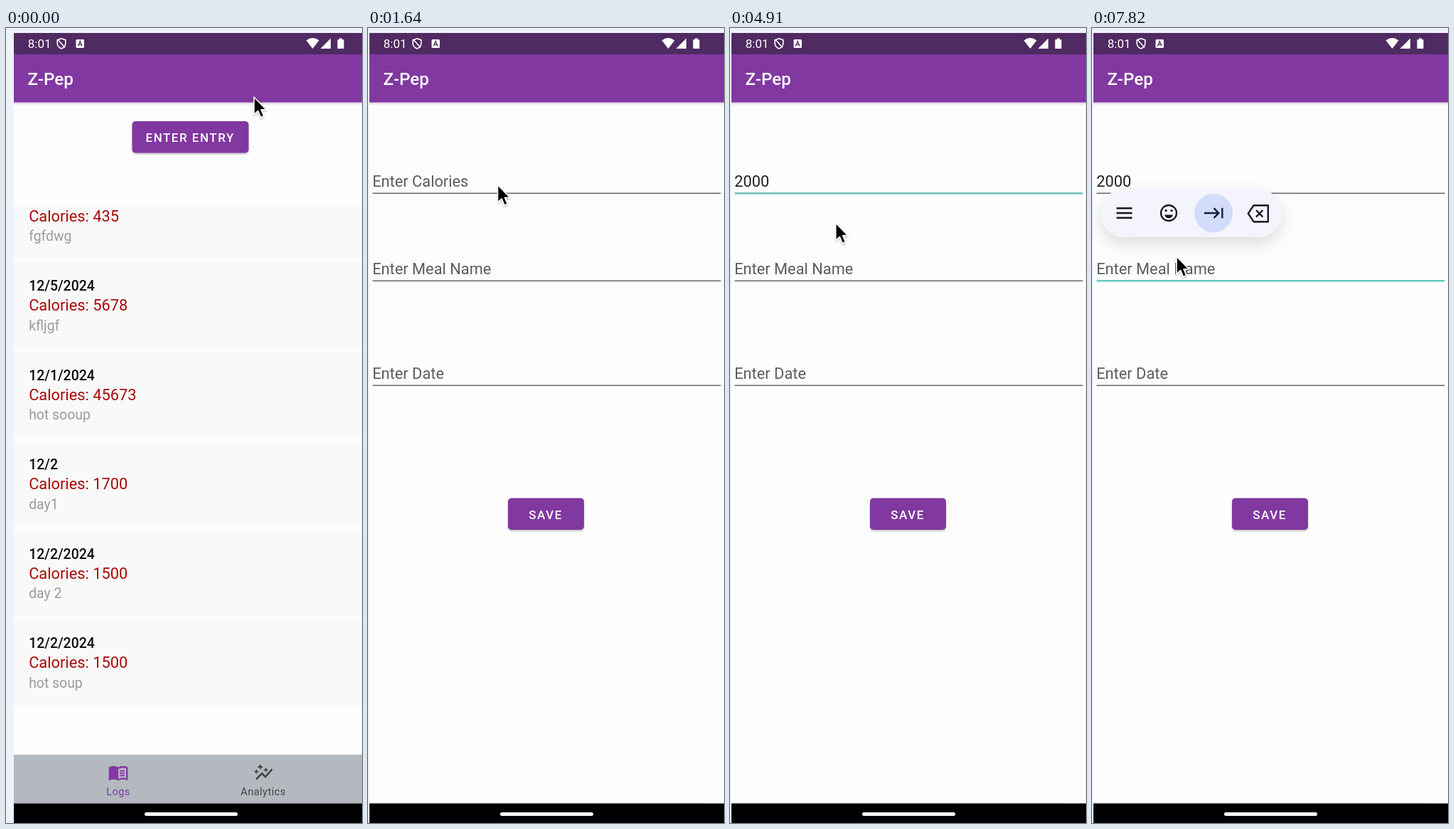
These frames come from a looping animation (501x1117 px, 8000 ms). An HTML page:

```html
<!DOCTYPE html>
<html lang="en">
<head>
<meta charset="utf-8">
<title>Calorie log</title>
<style>
  html, body { margin: 0; width: 100%; height: 100%; overflow: hidden; background: #f0f2f9; }
  svg { display: block; width: 501px; height: 1117px; }
  text { font-family: Roboto, sans-serif; white-space: pre; }
  .title { font-size: 24.2px; font-weight: 500; fill: #fff; }
  .date { font-size: 19.4px; font-weight: 500; fill: #0c0c0c; }
  .big { font-size: 21.8px; }
  .meal { font-size: 19.4px; fill: #9b9b9b; }
  .caps { font-size: 17px; font-weight: 500; letter-spacing: 1.52px; fill: #fff; }
  .tab { font-size: 14.5px; letter-spacing: .5px; text-anchor: middle; }
</style>
</head>
<body>
<svg viewBox="0 0 501 1117">
  <defs>
    <filter id="soft" x="-30%" y="-80%" width="160%" height="260%">
      <feDropShadow dx="0" dy="9" stdDeviation="11" flood-color="#000" flood-opacity=".13"/>
    </filter>
    <filter id="lift" x="-10%" y="-20%" width="120%" height="150%">
      <feDropShadow dx="0" dy="1.6" stdDeviation="1.3" flood-color="#000" flood-opacity=".28"/>
    </filter>
    <linearGradient id="edge" x2="0" y2="1">
      <stop stop-color="#d9cde0"/><stop offset="1" stop-color="#fdfdfd"/>
    </linearGradient>
    <clipPath id="content"><path d="M2 37H520V1089.5H2Z"/></clipPath>
  </defs>
  <rect width="501" height="1117" fill="#f0f2f9"/>
  <g id="phone">
    <g clip-path="url(#content)">
      <g id="list"></g>
      <g id="form"></g>
    </g>
    <g id="system"></g>
    <g id="toolbar"></g>
  </g>
  <path id="pointer" d="M0 0V24.5L5.6 19.3L9.5 28.6L13.8 26.8L10 17.7H17.3Z"
    fill="#000" stroke="#fff" stroke-width="1.6" stroke-linejoin="round" filter="url(#lift)"/>
</svg>
<script>
const LOOP = 8000, PURPLE = '#8138a0', RED = '#a80a0a';
const $ = id => document.getElementById(id);
const clamp = v => Math.max(0, Math.min(1, v));
const span = (t, from, to) => clamp((t - from) / (to - from));
const smooth = p => p * p * (3 - 2 * p);
const within = (t, from, to) => t >= from && t < to;

const text = (x, y, cls, value, extra = '') =>
  `<text x="${x}" y="${y}" class="${cls}" ${extra}>${value}</text>`;
const rect = (x, y, w, h, fill, extra = '') =>
  `<rect x="${x}" y="${y}" width="${w}" height="${h}" fill="${fill}" ${extra}/>`;
const button = (x, y, w, labelX, label) =>
  rect(x, y, w, 44.5, PURPLE, 'rx="4.8" filter="url(#lift)"') + text(labelX, y + 29, 'caps', label);
const page = () =>
  rect(2, 104, 520, 986, '#fdfdfd') + rect(2, 104, 520, 5, 'url(#edge)') +
  rect(2, 37, 520, 67.5, PURPLE) + text(21.4, 80, 'title', 'Z-Pep');

// Entries, the first one scrolled partly out of view
const entries = [
  ['', 435, 'fgfdwg'], ['12/5/2024', 5678, 'kfljgf'], ['12/1/2024', 45673, 'hot sooup'],
  ['12/2', 1700, 'day1'], ['12/2/2024', 1500, 'day 2'], ['12/2/2024', 1500, 'hot soup']
];
const entry = ([date, calories, meal], i) => {
  const y = 204.2 + i * 125.45, top = Math.max(y, 250);
  return rect(2, top, 520, y + 120 - top, '#f9f9f9') +
    text(23.2, y + 39.7, 'date', date) +
    text(23.2, y + 67.7, 'big', `Calories: ${calories}`, `fill="${RED}"`) +
    text(23.2, y + 95.2, 'meal', meal);
};

const book = 'M21 5c-1.1-.35-2.3-.5-3.5-.5-1.95 0-4.05.4-5.5 1.5-1.45-1.1-3.55-1.5-5.5-1.5S2.45 4.9 1 6' +
  'v14.65c0 .25.25.5.75.45C3.1 20.45 5.05 20 6.5 20c1.95 0 4.05.4 5.5 1.5 1.35-.85 3.8-1.5 5.5-1.5' +
  ' 1.65 0 3.35.3 4.75 1.05.5 0 .75-.2.75-.45V6c-.6-.45-1.25-.75-2-1zm0 13.5c-1.1-.35-2.3-.5-3.5-.5' +
  '-1.7 0-4.15.65-5.5 1.5V8c1.35-.85 3.8-1.5 5.5-1.5 1.2 0 2.4.15 3.5.5z';
const star = (x, y, r) => {
  const a = r * .31;
  return `M${x} ${y - r}l${a} ${r - a} ${r - a} ${a} ${a - r} ${a} ${-a} ${r - a} ${-a} ${a - r} ${a - r} ${-a} ${r - a} ${-a}z`;
};
const tabs =
  rect(2, 1021, 520, 69, '#b3b9bf') +
  `<g transform="translate(134.5 1031.5) scale(1.213)" fill="${PURPLE}"><path d="${book}"/>
    <path d="M13.8 10.6q2.6-1 5.6-.5M13.8 13.3q2.6-1 5.6-.5M13.8 16q2.6-1 5.6-.5" fill="none" stroke="${PURPLE}" stroke-width="1.4"/></g>` +
  `<g transform="translate(338.5 1031.5) scale(1.213)" fill="#444">
    <path d="${star(15, 9, 3) + star(4, 11, 3) + star(8.5, 5.5, 3.5)}"/>
    <path d="M3.7 19.8L10.5 13L14.5 17L22.3 8.2" fill="none" stroke="#444" stroke-width="2.1"/></g>` +
  text(149, 1078, 'tab', 'Logs', `fill="${PURPLE}"`) + text(353, 1078, 'tab', 'Analytics', 'fill="#444"');

$('list').innerHTML = page() + button(168.5, 131, 164, 187.5, 'ENTER ENTRY') +
  rect(168.5, 131, 164, 44.5, '#fff', 'rx="4.8" id="ripple"') +
  entries.map(entry).join('') + tabs;

// Form fields: baseline and hint
const fields = [[223, 'Enter Calories'], [346, 'Enter Meal Name'], [493, 'Enter Date']];
$('form').innerHTML = page() + fields.map(([y, hint], i) =>
  text(6.2, y, 'big', hint, `id="value${i}" fill="#5c5c5c"`) +
  `<path id="line${i}" d="M6.5 ${y + 9.3}H496.5"/>`).join('') +
  button(197, 660.5, 107, 226.3, 'SAVE') + rect(0, 0, 2.4, 26, '#45c4b5', 'id="caret"');

$('system').innerHTML = rect(2, 7, 520, 30, '#502a62') +
  text(21.8, 28, '', '8:01', 'font-size="17" fill="#fff"') +
  `<g fill="none" stroke="#fff" stroke-width="1.6"><path d="M69 14.8l5.8 2.1v4.6q0 5-5.8 7.6q-5.8-2.6-5.8-7.6v-4.6zM64 16.5L74 27.5"/></g>` +
  rect(89.5, 16, 11.5, 12, '#fff', 'rx="1.5"') +
  `<path d="M92.4 25.5L95.2 18.5L98 25.5M93.4 23.3H97" fill="none" stroke="#502a62" stroke-width="1.3"/>` +
  `<g fill="#fff"><path d="M413.5 17.4Q422.5 10.8 431.5 17.4L422.5 29ZM433.5 29H448V14.5ZM457.5 16.2h2.5v-1.7h4v1.7h2.5v12.8h-9z"/></g>` +
  rect(2, 1089.5, 520, 28, '#000') + rect(186, 1102, 131, 5, '#fff', 'rx="2.5"');

// Floating input toolbar, drawn around a vertical centre of 0
$('toolbar').innerHTML = rect(12, -34, 255, 68, '#f4f4fc', 'rx="34" filter="url(#soft)"') +
  `<circle cx="171" r="27" fill="#d3dbfb"/>
  <g fill="none" stroke="#17171f" stroke-width="2.4">
    <path d="M34.5 -6.7H56.5M34.5 0H56.5M34.5 6.7H56.5"/>
    <path d="M158 0H178M171.5 -6.8L178.3 0L171.5 6.8M183.3 -7.3V7.3" stroke="#141c3c"/>
    <path d="M227.5 -10.8H247.8V12.2H227.5L219.8 .7ZM231 -4L240.4 5.4M240.4 -4L231 5.4" stroke-linejoin="round"/>
  </g>
  <g id="smile" stroke="#17171f" fill="#17171f"><circle cx="108" r="11" fill="none" stroke-width="2.3"/>
    <circle cx="104" cy="-3.4" r="1.3" stroke-width=".8"/><circle cx="112" cy="-3.4" r="1.3" stroke-width=".8"/>
    <path d="M102 2.4H114Q112.4 7.2 108 7.2T102 2.4Z" stroke="none"/></g>`;

// Pointer legs: start, end, from x y, to x y
const legs = [
  [60, 720, 349, 97, 272, 159],
  [960, 1560, 272, 159, 182.5, 220.5],
  [4640, 5160, 182.5, 220.5, 119, 321]
];
const keys = [3550, 3730, 3950, 4270];

function movePointer(t) {
  const [a, b, x0, y0, x1, y1] = legs.filter(l => t >= l[0]).pop() || legs[0];
  const p = smooth(span(t, a, b));
  $('pointer').setAttribute('transform', `translate(${x0 + (x1 - x0) * p} ${y0 + (y1 - y0) * p})`);
}

function drawForm(t) {
  const typed = '2000'.slice(0, keys.filter(k => t >= k).length);
  const focus = t < 2200 ? -1 : t < 5550 ? 0 : 1;
  fields.forEach((f, i) => {
    const line = $('line' + i), on = i === focus;
    line.setAttribute('stroke', on ? (i ? '#60cdbc' : '#74bfb5') : '#666');
    line.setAttribute('stroke-width', on ? 2.5 : 1.5);
  });
  $('value0').textContent = typed || fields[0][1];
  $('value0').setAttribute('fill', typed ? '#202020' : '#5c5c5c');

  const blink = within(t, 2910, 3360) || within(t, 3550, 4730) || within(t, 6270, 6820) || within(t, 7270, 7820);
  $('caret').setAttribute('opacity', blink ? 1 : 0);
  $('caret').setAttribute('x', 7 + 12.26 * (focus ? 0 : typed.length));
  $('caret').setAttribute('y', focus === 1 ? 325 : 202);
}

function drawToolbar(t) {
  const second = t >= 5640, start = second ? 5640 : 2270;
  const age = t - start;
  const alpha = age < 0 ? 0 : second ? span(age, -60, 60) : span(age, -60, 60) * (1 - span(t, 3550, 3700));
  const slide = 30 * Math.exp(-Math.max(0, age) / 98);
  $('toolbar').setAttribute('opacity', alpha);
  $('toolbar').setAttribute('transform', `translate(${slide < .4 ? 0 : slide} ${second ? 260 : 107})`);
  $('smile').setAttribute('opacity', second ? 1 : .42);
}

function update(t) {
  $('phone').setAttribute('transform', `translate(${t < 90 ? 9 : 0} 0)`);
  $('ripple').setAttribute('opacity', .13 * span(t, 700, 800));
  const enter = 1 - Math.pow(1 - span(t, 1000, 1450), 3);
  $('list').setAttribute('transform', `translate(${-50 * enter} 0)`);
  $('form').setAttribute('transform', `translate(${50 * (1 - enter)} 0)`);
  $('form').setAttribute('opacity', span(t, 1040, 1130));
  drawForm(t);
  drawToolbar(t);
  movePointer(t);
}

const begin = performance.now();
function tick() {
  update((performance.now() - begin) % LOOP);
  requestAnimationFrame(tick);
}
tick();
</script>
</body>
</html>
```
